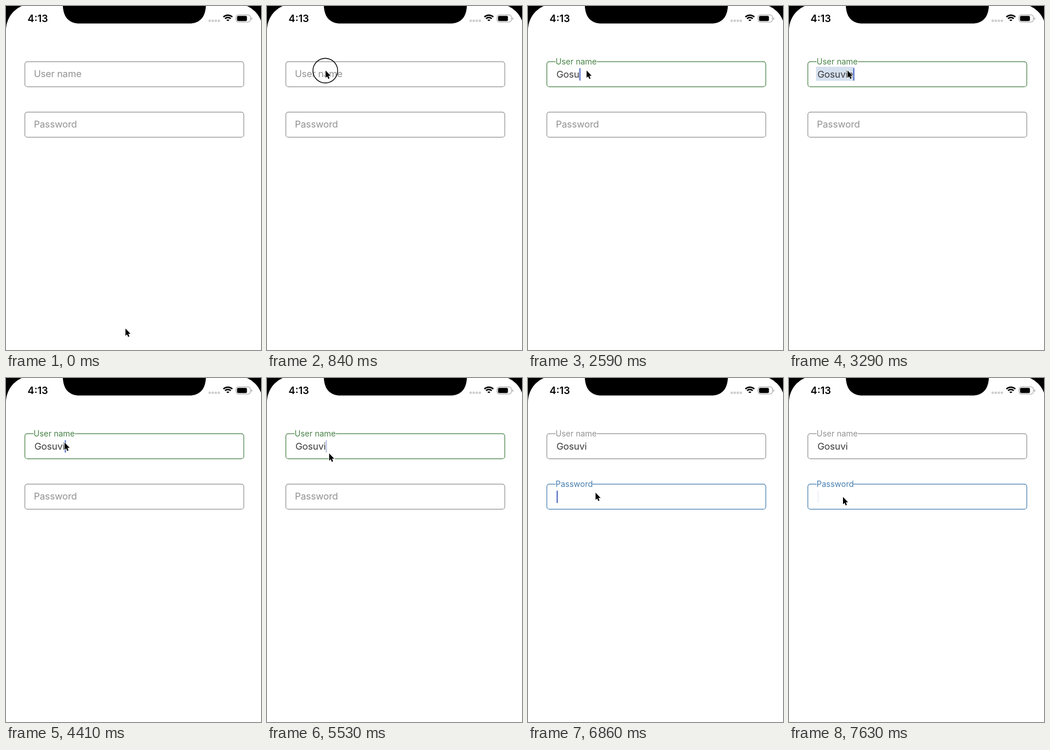
Animation of 444 by 600 pixels, one loop 8000 ms. Source, as an HTML page with a canvas:

```html
<!DOCTYPE html>
<html lang="en">
<head>
<meta charset="utf-8">
<title>Login form</title>
<style>
html, body { margin: 0; width: 100%; height: 100%; overflow: hidden; background: #fff; }
canvas { display: block; }
</style>
</head>
<body>
<canvas id="stage" width="444" height="600"></canvas>
<script>
const ctx = document.getElementById('stage').getContext('2d');
const LOOP = 8000, STEP = 70;
const GREY = [146, 146, 146], GREEN = [72, 130, 70], BLUE = [70, 126, 176];
const SIZE = 16.5, TRACKING = -.17, TEXT_X = 49.4;

// Moments of the interaction, in ms
const KEYS = [2030, 2380, 2450, 2590, 2800, 2940, 3010];
const ERASE = 4410, USER_FOCUS = 980, USER_BLUR = 6160, PASS_FOCUS = 6580, PASS_READY = 6790;
const TAPS = [USER_FOCUS - 140, USER_BLUR - 140];
const MOVES = [
  { at: 0, ms: 210, x: 111, y: 236 },
  { at: 350, ms: 420, x: 102, y: 112.5 },
  { at: 5460, ms: 210, x: 126, y: 186 },
  { at: 5740, ms: 210, x: 122, y: 198.5 },
  { at: 6790, ms: 280, x: 94, y: 207.5 }
];

const lerp = (a, b, p) => a + (b - a) * p;
const ramp = (t, at, ms) => Math.min(1, Math.max(0, (t - at) / ms));
const ease = (t, at, ms) => { const p = ramp(t, at, ms); return p * p * (3 - 2 * p); };
const mix = (a, b, p) => `rgb(${a.map((v, i) => Math.round(lerp(v, b[i], p)))})`;

function text(str, x, y, size, color, spacing = 0, weight = 400) {
  ctx.font = `${weight} ${size}px Inter, sans-serif`;
  ctx.letterSpacing = spacing + 'px';
  ctx.fillStyle = color;
  ctx.fillText(str, x, y);
  return ctx.measureText(str).width;
}

function box(x, y, w, h, r) {
  ctx.beginPath();
  ctx.roundRect(x, y, w, h, r);
}

function disc(x, y, r) {
  ctx.beginPath();
  ctx.arc(x, y, r, 0, 7);
}

function bar(x, y, w, h, color, alpha) {
  ctx.globalAlpha = alpha;
  ctx.fillStyle = color;
  ctx.fillRect(x, y, w, h);
  ctx.globalAlpha = 1;
}

const notch = new Path2D('M99 0C100 20 110 30.5 128 30.5H319C337 30.5 347 20 348 0Z');
const arrow = new Path2D('M0 0V13.6L3 10.8 5 15.6 7.3 14.6 5.3 9.9H9.4Z');

function statusBar() {
  // the screen is slightly larger than the stage
  ctx.fillStyle = '#000';
  ctx.fillRect(0, 0, 444, 80);
  ctx.fillStyle = '#fff';
  box(0, -4, 447, 700, 46);
  ctx.fill();
  ctx.fillStyle = '#000';
  ctx.fill(notch);
  text('4:13', 37.6, 28, 17.4, '#000', 0, 600);

  ctx.fillStyle = '#cdcdcd';
  for (let i = 0; i < 4; i++) {
    disc(354.7 + i * 5.3, 25.8, 2.2);
    ctx.fill();
  }

  // wifi: two bands and a wedge
  ctx.strokeStyle = ctx.fillStyle = '#000';
  ctx.lineWidth = 2.4;
  for (const r of [11, 7, 2.4]) {
    ctx.beginPath();
    ctx.arc(386.3, 27, r, -Math.PI * .75, -Math.PI * .25);
    ctx.stroke();
  }

  ctx.strokeStyle = ctx.fillStyle = '#9a9a9a';
  ctx.lineWidth = 1;
  box(400.5, 15.5, 25, 12.5, 3.8);
  ctx.stroke();
  box(427, 20, 1.4, 4, 1);
  ctx.fill();
  ctx.fillStyle = '#000';
  box(402.3, 17.3, 17.2, 8.9, 2);
  ctx.fill();
}

function field(y, label, lift, focus, color, gap) {
  const tint = mix(GREY, color, focus);
  ctx.strokeStyle = tint;
  ctx.lineWidth = 1.2;
  box(32.8, y, 381.2, 43.8, 4.5);
  ctx.stroke();
  ctx.fillStyle = '#fff';
  ctx.fillRect(48, y - 2, gap * lift, 4);
  text(label, lerp(48.4, 48, lift), y + lerp(27.2, 4.9, lift),
    lerp(SIZE, 14, lift), tint, lerp(TRACKING, 0, lift));
}

// Solid after each input, then blinks softly
function caretAlpha(t) {
  const last = [USER_FOCUS, ...KEYS, ERASE, PASS_READY].filter(k => k <= t).pop();
  if (!last || (t >= USER_BLUR && t < PASS_READY)) return 0;
  const phase = (t - last) % 1260;
  return 1 - .9 * (ramp(phase, 600, 210) - ramp(phase, 1050, 210));
}

function pointer(t) {
  let x = 208, y = 562.5;
  for (const m of MOVES) {
    const p = ease(t, m.at, m.ms);
    x = lerp(x, m.x, p);
    y = lerp(y, m.y, p);
  }
  if (TAPS.some(tap => t >= tap && t < tap + 140)) {
    ctx.strokeStyle = '#000';
    ctx.lineWidth = 1.4;
    disc(x - .5, y + .3, 21.5);
    ctx.stroke();
  }
  ctx.save();
  ctx.translate(x, y);
  ctx.scale(.94, .94);
  ctx.strokeStyle = '#fff';
  ctx.lineWidth = 1.8;
  ctx.stroke(arrow);
  ctx.fillStyle = '#000';
  ctx.fill(arrow);
  ctx.restore();
}

function draw(t) {
  statusBar();
  const userLift = ease(t, USER_FOCUS - 70, 280);
  const passLift = ease(t, PASS_FOCUS - 70, 280);
  field(97.1, 'User name', userLift, t < USER_BLUR ? userLift : 0, GREEN, 72);
  field(185.1, 'Password', passLift, passLift, BLUE, 64);

  bar(47, 106, 67, 24.5, '#d5e0ef', ramp(t, 3150, 140) - ramp(t, 4130, 280));
  const count = KEYS.filter(k => k <= t).length - (t >= ERASE);
  const typed = 'Gosuvie'.slice(0, count);
  const end = text(typed, TEXT_X, 125, SIZE, '#3c3c3c', TRACKING);
  const onUser = t < USER_BLUR;
  bar(onUser ? TEXT_X + end : 49.8, onUser ? 108.5 : 196.5, 2, 21.5, '#4a66c0', caretAlpha(t));
  pointer(t);
}

function tick() {
  const t = performance.now() % LOOP;
  draw(Math.floor(t / STEP) * STEP);
  requestAnimationFrame(tick);
}
tick();
</script>
</body>
</html>
```
